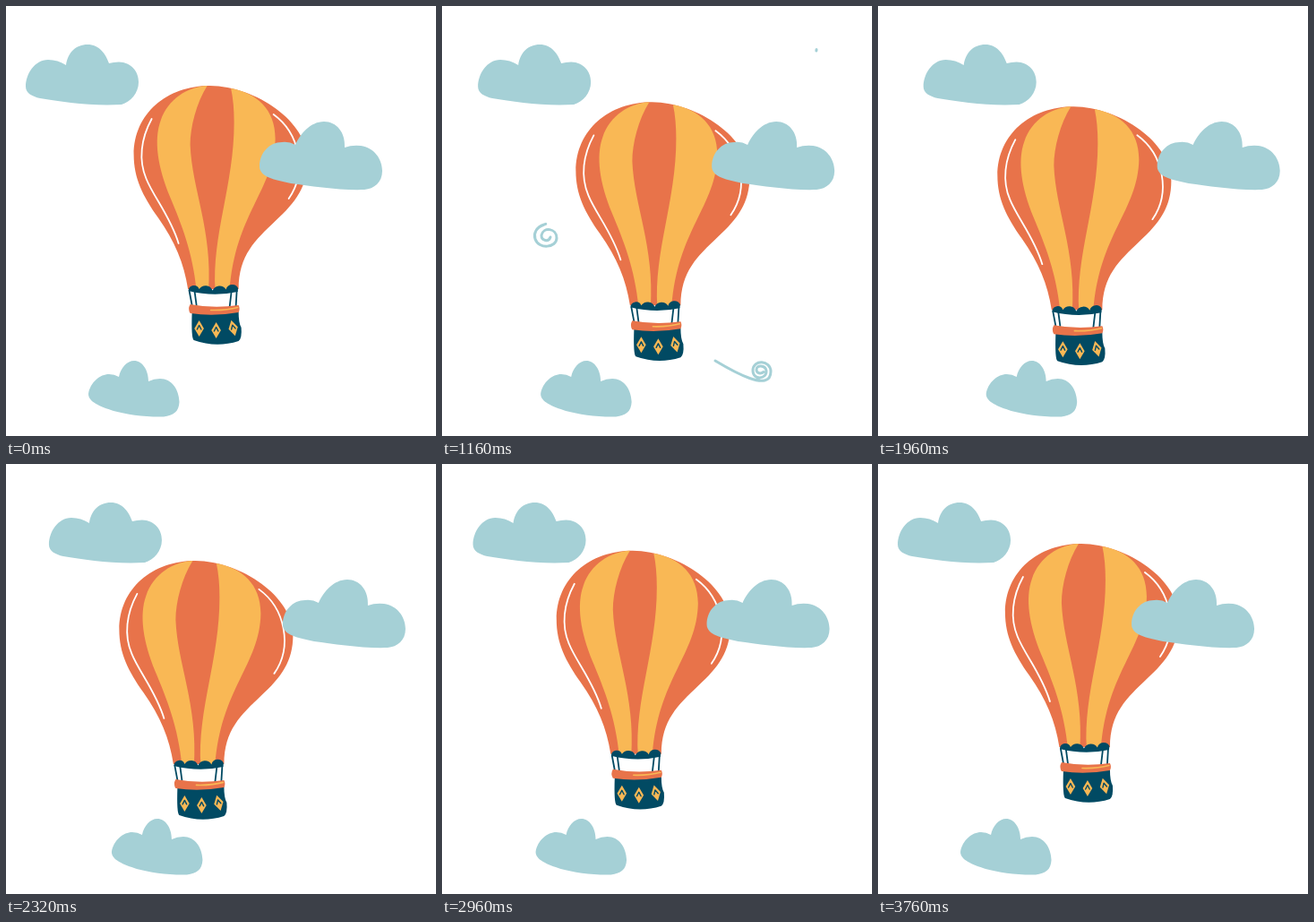
An HTML page for the animation above (3.8 s loop, 480 by 480 pixels).

```html
<!DOCTYPE html>
<html lang="en">
<head>
<meta charset="utf-8">
<title>Hot air balloon</title>
<style>
  html, body { margin: 0; height: 100%; overflow: hidden; background: #fff; }
  svg { display: block; width: 100vw; height: 100vh; }
  .sky { fill: #a5d0d6; }
  .orange { fill: #e8734a; }
  .yellow { fill: #f9b855; }
  .navy { fill: #014a63; }
  .line { fill: none; stroke-linecap: round; stroke-linejoin: round; }
  .swirl { stroke: #a5d0d6; stroke-width: 3; }
  .shine { stroke: #fff; stroke-width: 1.8; }
  .rope { stroke: #014a63; stroke-width: 1.8; }
</style>
</head>
<body>
<svg viewBox="0 0 480 480">
  <defs>
    <g id="diamond">
      <path class="yellow" d="M0-9L5.300 0L0 9L-5.300 0Z"/>
      <path class="line rope" d="M-2.300 1L0-3.500L2.300 1" style="stroke-width:1.4"/>
    </g>
  </defs>

  <path class="line swirl" pathLength="1" data-start="55" d="M368 79C398 74 428 68 429 50C429 36 408 37 407 49C407 61 424 60 424 50C423 43 412 44 412 50C413 54 418 54 418 48.500"/>
  <path class="line swirl" pathLength="1" data-start="255" d="M37 272C80 278 134 284 134 258C134 246 123 240 114 244C105 247 102 254 104 260C108 272 128 270 128 259C128 248 113 246 111 256C111 262 119 264 121 258"/>
  <path class="line swirl" pathLength="1" data-start="560" d="M305 396C325 408 367 432 367 408C367 395 347 394 347 407C347 418 363 417 362 407C361 401 351 400 351 406C351 410 356 411 359 408.500"/>

  <g id="balloon">
    <path class="orange" d="M203.500 316C199 287 189 263 170 236C153 212 143 192 143 166C143 120 180 89 228 89C280 90 337 129 337 172C337 201 324 219 301 240C279 261 260 278 260 316Z"/>
    <path class="yellow" d="M213 318C209 275 196 243 183 212C170 180 165 150 173 128C181 104 203 90 225 89C213 108 206 135 206 155C208 205 231 250 226.500 318Z"/>
    <path class="yellow" d="M234 318C230 255 255 200 255 130Q255 108 251.500 92C280 97 301 115 301 148C300 205 256 232 250 318Z"/>
    <path class="line shine" d="M163 126C151 148 148 172 157 193C165 213 184 235 193 265M299 121C328 142 337 185 316 215"/>
    <path class="line rope" d="M205 318L208 334M211 319L213 334M252 319L250 336M258 318L257 335"/>
    <path class="navy" d="M204 318A6.200 6.200 0 0 1 216 316A8.500 8.500 0 0 1 231 317.500A8.500 8.500 0 0 1 246 316.500A7.200 7.200 0 0 1 259.500 315L259 319Q232 325 204 318Z"/>
    <path class="navy" d="M208 342Q232 346 260 341Q260 354 263 359Q264 371 260 374Q235 382 210 373Q207 371 208 342Z"/>
    <path class="orange" d="M206 333Q232 338 260 334Q262 338 260 342Q232 347 206 343Q203 338 206 333Z"/>
    <path class="line" stroke="#f9b855" stroke-width="1.6" d="M229 339.500Q246 340 259 336.500"/>
    <use href="#diamond" x="216" y="360"/>
    <use href="#diamond" x="235" y="362"/>
    <use href="#diamond" transform="translate(254 359.500) rotate(-14)"/>
  </g>

  <g id="clouds" class="sky">
    <path d="M22 90C22 76 32 60 47 60Q58 60 67 66C69 52 78 43 91 43C104 43 111 53 115 64Q120 62.500 126 62.500C140 63 148 73 148 85C148 97 139 107 129 110C95 112 62 107 38 103C29 101 22 97 22 90Z"/>
    <path d="M283 179C283 164 294 152 308 152Q316 151 323 155C328 143 340 129 355 129C369 129 379 141 378 158Q386 155 396 156C411 158 420 171 420 184C420 197 411 204 400 205C372 206 340 201 318 198C300 194 283 191 283 179Z"/>
    <path d="M92 433C94 420 105 411 115 411Q121 411 126 414C128 404 135 396 143 396C152 396 159 406 159 419Q165 416 172 416C185 416 193 428 193.500 442C193 453 187 457 176 458.500C155 459 135 456 120 452C105 447 92 442 92 433Z"/>
  </g>
</svg>
<script>
const LOOP = 3800, TURN = 1970, DRIFT = 28.7;
const DRAW = 490, ERASE_DELAY = 620;
const balloon = document.getElementById('balloon');
const clouds = document.getElementById('clouds');
const swirls = document.querySelectorAll('.swirl');

// Closed balloon path: [time, x, y]
const route = [
  [0, -0.4, 0], [560, 8.3, 7.8], [1160, 6.4, 18.3],
  [1640, -2, 24.8], [2320, -16.6, 18.9], [2960, -15.2, 7.8]
];

const clamp = v => Math.min(1, Math.max(0, v));
const smooth = v => v * v * (3 - 2 * v);

function stop(i) {
  const n = route.length, [t, x, y] = route[(i + n) % n];
  return [t + LOOP * Math.floor(i / n), x, y];
}

// Cubic Hermite interpolation through the route
function position(t) {
  let i = route.length - 1;
  while (route[i][0] > t) i--;
  const [a, b, c, d] = [-1, 0, 1, 2].map(k => stop(i + k));
  const span = c[0] - b[0], u = (t - b[0]) / span;
  return [1, 2].map(k => {
    const m0 = (c[k] - a[k]) / (c[0] - a[0]) * span;
    const m1 = (d[k] - b[k]) / (d[0] - b[0]) * span;
    return b[k] + (c[k] - b[k]) * smooth(u) + m0 * u * (1 - u) ** 2 - m1 * u * u * (1 - u);
  });
}

function move(el, x, y) {
  el.setAttribute('transform', `translate(${x.toFixed(2)} ${y.toFixed(2)})`);
}

function render(now) {
  const t = now % LOOP;
  move(balloon, ...position(t));
  move(clouds, DRIFT * smooth(t < TURN ? t / TURN : (LOOP - t) / (LOOP - TURN)), 0);
  for (const swirl of swirls) {
    const age = t - swirl.dataset.start;
    const head = clamp(age / DRAW), tail = clamp((age - ERASE_DELAY) / DRAW);
    swirl.style.display = head > tail ? '' : 'none';
    swirl.style.strokeDasharray = `${head - tail} 2`;
    swirl.style.strokeDashoffset = -tail;
  }
}

function tick() {
  render(performance.now());
  requestAnimationFrame(tick);
}
tick();
</script>
</body>
</html>
```
